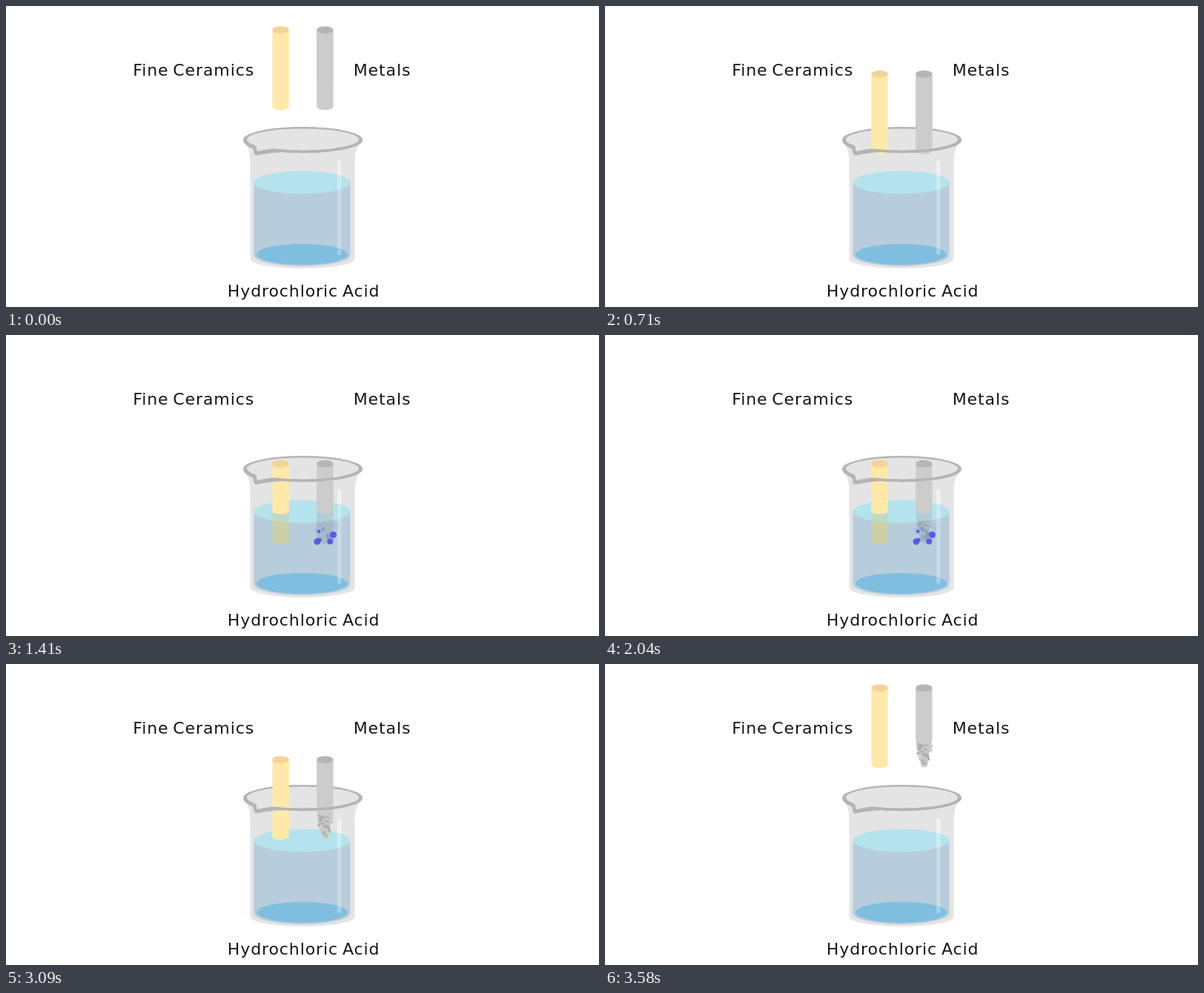
Animation of 800x406 px, one loop 5580 ms. Source, as an HTML page:

```html
<!DOCTYPE html>
<html lang="en">
<head>
<meta charset="utf-8">
<title>Rods in acid</title>
<style>
  html, body { margin: 0; width: 100%; height: 100%; overflow: hidden; background: #fff; }
  svg { display: block; width: 100vw; height: 100vh; }
  text { font: 22px "DejaVu Sans", sans-serif; letter-spacing: .9px; word-spacing: -2px; fill: #161616; }
</style>
</head>
<body>
<svg viewBox="0 0 800 406">
  <defs>
    <path id="rim" fill="#b4b4b4" fill-rule="evenodd" d="M320 180.5A80.5 17.5 0 0 1 481 180.5A80.5 17.5 0 0 1 372 197L359 198Q349 199 340 201Q335 202 334.5 198L333.5 192.5Q320 187 320 180.5Z
      M325 180A75.5 14.5 0 0 1 476 180A75.5 14.5 0 0 1 362 192.6L358 192.8Q348 194 340 196L338.5 195.5L337.5 190Q336.5 188 333 187Q325 184 325 180Z"/>
    <ellipse id="surface" cx="399.5" cy="238" rx="65" ry="15.3" fill="#b5e4ee"/>
    <clipPath id="front"><rect y="182" width="800" height="40"/></clipPath>
    <clipPath id="air">
      <rect width="800" height="237"/>
      <ellipse cx="370.5" cy="236.8" rx="12" ry="4.7"/>
      <ellipse cx="430.3" cy="236.8" rx="12" ry="4.7"/>
    </clipPath>
    <clipPath id="under"><rect y="237" width="800" height="100"/></clipPath>
    <!-- The shine is weaker below the water line -->
    <linearGradient id="shine" x2="0" y2="1" stop-color="#fff">
      <stop offset=".156" stop-color="#fff" stop-opacity=".5"/>
      <stop offset=".156" stop-color="#fff" stop-opacity=".28"/>
    </linearGradient>
  </defs>
  <rect width="800" height="406" fill="#fff"/>

  <path fill="#e4e4e4" d="M324 187Q329.5 196 329.5 208V341A70.5 13 0 0 0 470.5 341V208Q471 196 476 187Z"/>
  <ellipse cx="400.5" cy="180.5" rx="79" ry="16" fill="#e4e4e4"/>
  <path fill="#b7cddc" d="M334.5 238V336A65 15 0 0 0 464.5 336V238Z"/>
  <ellipse cx="399.5" cy="335" rx="61.5" ry="14" fill="#80bee0"/>
  <use href="#surface"/>
  <use href="#rim"/>

  <g clip-path="url(#under)"><g id="wet" opacity=".95"></g></g>
  <use href="#surface" opacity=".5"/>
  <g id="bubbles"></g>
  <g clip-path="url(#air)"><g id="dry"></g></g>

  <use href="#rim" clip-path="url(#front)"/>
  <rect x="447" y="208" width="5.5" height="128" rx="2.7" fill="url(#shine)"/>

  <text x="171.2" y="94.3">Fine Ceramics</text>
  <text x="468.7" y="94.3">Metals</text>
  <text x="298.8" y="392.3">Hydrochloric Acid</text>
</svg>
<script>
const LOOP = 5580, STEP = 70, SPEED = 14.88, DEPTH = 141.4;
const $ = id => document.getElementById(id);
const clamp = (v, lo = 0, hi = 1) => Math.min(hi, Math.max(lo, v));
const ramp = (v, a, b) => clamp((v - a) / (b - a));

function make(parent, tag, attrs) {
  const el = document.createElementNS("http://www.w3.org/2000/svg", tag);
  for (const k in attrs) el.setAttribute(k, attrs[k]);
  return parent.appendChild(el);
}

function seeded(seed) {
  return () => (seed = (seed * 16807) % 2147483647) / 2147483647;
}

// A cylinder from y1 to y2 with a rounded lower end
function bar(parent, cx, y1, y2, fill) {
  return make(parent, "path", {
    fill, d: `M${cx - 11.2} ${y1}V${y2}A11.2 4.8 0 0 0 ${cx + 11.2} ${y2}V${y1}Z`
  });
}

function cap(parent, cx, fill) {
  make(parent, "ellipse", { cx, cy: 32.3, rx: 11.2, ry: 4.9, fill });
}

// The eaten end of the metal: grains packed into a taper
function crumbs(parent, cx, base, light, dark) {
  const g = make(parent, "g", {});
  const rnd = seeded(77);
  make(g, "path", {
    fill: base,
    d: `M${cx - 10.5} 104h21l-1 9l-2 6l-2 8l-1 6l-2 6h-4l-2-6l-3-4l-1-7l-2-6Z`
  });
  for (let i = 0; i < 48; i++) {
    const y = 108 + 29 * i / 47;
    const half = y < 118 ? 11.2 : 11.2 - (y - 118) * 0.38;
    const r = 1.8 + rnd() * 1.2;
    const x = cx + 0.4 + (rnd() * 2 - 1) * (half - r);
    make(g, "ellipse", {
      cx: x, cy: y, rx: r * 1.15, ry: r * 0.85, fill: i % 3 ? light : dark
    });
  }
  return g;
}

function rods(parent, c) {
  bar(parent, 370.5, 32.3, 135.6, c.ceramic);
  cap(parent, 370.5, c.ceramicTop);
  const whole = bar(parent, 430.3, 32.3, 135.6, c.metal);
  const eaten = crumbs(parent, 430.3, c.base, c.light, c.dark);
  bar(parent, 430.3, 32.3, 103, c.metal);
  cap(parent, 430.3, c.metalTop);
  return { parent, whole, eaten };
}

const sets = [
  rods($("wet"), {
    ceramic: "#cdd2a3", ceramicTop: "#cdd2a3", metal: "#a5b7c4", metalTop: "#a5b7c4",
    base: "#a4b4c0", light: "#aab9c5", dark: "#95a5b1"
  }),
  rods($("dry"), {
    ceramic: "#ffe9a9", ceramicTop: "#f3d495", metal: "#ccc", metalTop: "#b5b5b5",
    base: "#c4c4c4", light: "#cbcbcb", dark: "#acacac"
  })
];

// x, y, radius, colour, opacity
const faint = make($("bubbles"), "g", {});
const solid = make($("bubbles"), "g", {});
const dot = (g, [cx, cy, r, fill, opacity]) => make(g, "circle", { cx, cy, r, fill, opacity });
[
  [445.5, 258, 4.8, "#a3bfdb", 0.65],
  [421, 264, 4.8, "#a0b9d6", 0.6],
  [427.8, 262, 2.4, "#7c8fc4", 0.7],
  [435, 271.5, 3.8, "#7f90c6", 0.65],
  [423, 276.5, 2.8, "#4650c4", 0.8]
].forEach(b => dot(faint, b));
[
  [441.5, 269.5, 4.5],
  [419.8, 278.6, 4.4],
  [437.3, 278.4, 4],
  [422.2, 265, 2.2]
].forEach(b => dot(solid, [...b, "#4f52ea", 0.92]));

function draw(t) {
  const n = t < 500 ? 0 : Math.floor((t - 500) / STEP) + 1;
  const out = Math.max(0, n - 35);
  const y = clamp(n * SPEED, 0, DEPTH) - clamp(out * SPEED, 0, DEPTH);
  const wear = ramp(n, 13, 23);
  for (const s of sets) {
    s.parent.setAttribute("transform", `translate(0 ${y})`);
    s.whole.setAttribute("opacity", 1 - wear);
    s.eaten.setAttribute("opacity", wear);
  }
  const show = ramp(n, 9, 13) * (1 - ramp(n, 25, 32));
  solid.setAttribute("opacity", show);
  faint.setAttribute("opacity", show * (0.75 + 0.25 * Math.cos((n - 14) * Math.PI * 2 / 9)));
}

function tick() {
  draw(performance.now() % LOOP);
  requestAnimationFrame(tick);
}
tick();
</script>
</body>
</html>
```
